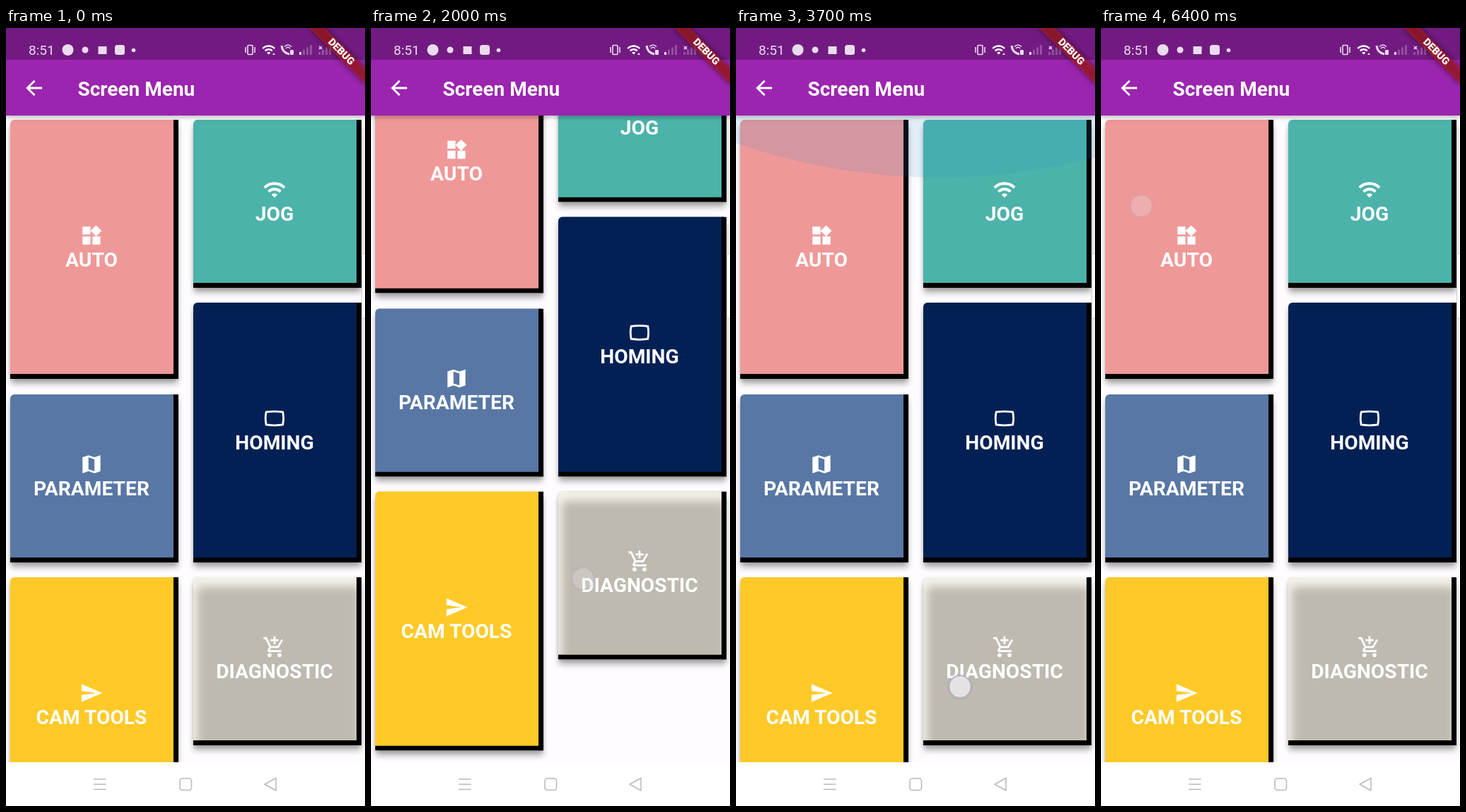
An HTML page that plays this animation: 508x1102 px, repeating every 6500 ms.

```html
<!DOCTYPE html>
<html lang="en">
<head>
<meta charset="utf-8">
<title>Screen Menu</title>
<style>
html, body { margin: 0; width: 100%; height: 100%; overflow: hidden; background: #fff; }
#stage { position: relative; width: 508px; height: 1102px; overflow: hidden; background: #fff; font-family: Roboto, sans-serif; }
#view { position: absolute; top: 124px; left: 0; width: 508px; height: 916px; overflow: hidden; background: #fefcfe; }
#view > svg, #over { position: absolute; top: 0; left: 0; }
.card { --drop: 0 8px 9px -1px rgba(0,0,0,.3), 0 2px 5px rgba(0,0,0,.14); position: absolute; box-sizing: border-box; width: 238px; border: solid #000; border-width: 0 7px 7px 0; border-radius: 6px 0 0 0; box-shadow: var(--drop); }
.sunken { box-shadow: inset 5px 13px 13px #f5f2ea, var(--drop); }
.card svg { position: absolute; left: 50%; top: 50%; width: 1px; height: 1px; overflow: visible; }
.card text { font: 700 28.2px Roboto, sans-serif; fill: #fff; text-anchor: middle; }
.solid { fill: #fff; fill-rule: evenodd; }
.line { fill: none; stroke: #fff; }
#bar { position: absolute; top: 0; left: 0; width: 508px; height: 124px; background: linear-gradient(#731a82 45px, #9b25af 45px); box-shadow: 0 3px 6px rgba(0,0,0,.25); }
#title { font: 700 28px Roboto, sans-serif; fill: #fff; }
#clock { font: 400 19px Roboto, sans-serif; }
#banner { position: absolute; left: 508px; top: 0; transform: rotate(45deg); }
#banner div { position: absolute; left: -56.4px; top: 39.5px; width: 112.9px; height: 16.9px; }
#banner .shade { background: rgba(0,0,0,.5); filter: blur(4px); }
#banner .label { background: rgba(183,28,28,.63); color: #fff; font: 900 14.4px/16.9px Roboto, sans-serif; text-align: center; }
</style>
</head>
<body>
<div id="stage">
  <div id="view">
    <div id="list"></div>
    <svg width="508" height="916"><ellipse id="glow" cx="288" rx="762" fill="#218cd2" fill-opacity=".13"/></svg>
  </div>
  <div id="bar"></div>
  <svg id="over" width="508" height="1102">
    <path class="line" stroke-width="2.8" d="M51 85H30.500M40.500 74.700L30.200 85l10.300 10.300"/>
    <text id="title" x="101.500" y="96">Screen Menu</text>
    <g fill="#eadcee">
      <text id="clock" x="32" y="38">8:51</text>
      <circle cx="87.500" cy="31" r="8"/>
      <circle cx="112" cy="31" r="4.500"/>
      <rect x="130.500" y="26" width="12" height="11"/>
      <rect x="154" y="24" width="14" height="14" rx="3.500"/>
      <circle cx="180.500" cy="31.500" r="2.800"/>
      <path d="M377 38l2-3 2 3z"/>
      <rect x="402" y="31" width="5" height="7" rx="1"/>
      <g id="bars"></g>
      <rect x="468" y="25" width="10" height="13" rx="2" opacity=".5"/>
    </g>
    <g fill="none" stroke="#eadcee" stroke-width="1.600">
      <rect x="342" y="24.500" width="7" height="13" rx="1"/>
      <path d="M339 27v8M352 27v8M396 29q3-3.500 6 0M394 26.500q5-5 10 0M443 26l4 4m0-4l-4 4"/>
      <path stroke-width="3" d="M390 25q1 10 11 12"/>
    </g>
    <g id="signal"></g>
    <rect x="503.500" y="319.500" width="9" height="92" rx="3" fill="#fff" fill-opacity=".85" stroke="#c8c6c9" stroke-opacity=".8"/>
    <g fill="none" stroke="#b9b9b9" stroke-width="1.500">
      <path stroke-linejoin="round" d="M124 1064h17.500m-17.500 7.300h17.500m-17.500 7.200h17.500M382 1062.500v17.500l-16-8.750z"/>
      <rect x="246" y="1063" width="16.500" height="16.500" rx="3.500"/>
    </g>
    <g id="touch">
      <circle r="18" fill="#8d88b5" fill-opacity=".18"/>
      <circle r="15.500" fill="#e8e7e6" fill-opacity=".92" stroke="#b3b0cb" stroke-width="1.600"/>
    </g>
  </svg>
  <div id="banner"><div class="shade"></div><div class="label">DEBUG</div></div>
</div>
<script>
const $ = id => document.getElementById(id);
const clamp = (v, lo = 0, hi = 1) => Math.min(hi, Math.max(lo, v));
const solid = d => `<path class="solid" d="${d}"/>`;
const line = (d, w = 2) => `<path class="line" stroke-width="${w}" d="${d}"/>`;

// icons on a 24 unit grid
const wifi = line('M2 10a14.140 14.140 0 0 1 20 0M6 14a8.500 8.500 0 0 1 12 0', 2.8) + solid('M9 17a4.240 4.240 0 0 1 6 0l-3 3z');
const widgets = solid('M3 3h8v8H3zM3 13h8v8H3zM13 13h8v8h-8zM16.700 1.700l5.600 5.600-5.600 5.700L11 7.300z');
const frame = line('M3.700 5.600Q12 4.400 20.300 5.600Q21.700 12 20.300 18.400Q12 19.600 3.700 18.400Q2.300 12 3.700 5.600z');
const map = solid('M3 5l6-2 6 2 6-2v16l-6 2-6-2-6 2zM9 5v12l6 2V7z');
const send = solid('M2 21l21-9L2 3v7l15 2-15 2z');
const wheel = x => `<circle class="solid" cx="${x}" cy="20" r="2"/>`;
const cart = line('M1 3h2.600l4.300 9h7.600l4.300-7.500M7.500 12.500L6 15.200Q5.800 16 7 16h12M12 1v8M8 5h8') + wheel(7) + wheel(17);

// label, column, first row, rows, colour, icon
const cards = [
  ['AUTO', 0, 0, 3, '#ef9898', widgets],
  ['JOG', 1, 0, 2, '#4cb3aa', wifi],
  ['HOMING', 1, 2, 3, '#022054', frame],
  ['PARAMETER', 0, 3, 2, '#5877a5', map],
  ['CAM TOOLS', 0, 5, 3, '#ffc927', send],
  ['DIAGNOSTIC', 1, 5, 2, '#bfbab0', cart]
];
const UNIT = 129.6, GAP = 21.4;
$('list').innerHTML = cards.map(([label, col, row, rows, color, icon]) =>
  `<div class="card${icon === cart ? ' sunken' : ''}" style="left:${5.5 + col * 259}px;top:${6 + row * UNIT}px;height:${rows * UNIT - GAP}px;background-color:${color}">
    <svg><g transform="translate(-17 -33) scale(1.411)">${icon}</g><text y="27.6">${label}</text></svg></div>`).join('');

// two signal meters, only the very first bar lit
$('bars').innerHTML = [415, 442].map((x, n) => [0, 1, 2, 3].map(i =>
  `<rect x="${x + i * 5}" y="${34 - i * 3.3}" width="3" height="${4 + i * 3.3}" opacity="${i || n ? .28 : 1}"/>`).join('')).join('');
$('signal').innerHTML = `<g transform="translate(361.500 20.500) scale(.85)">${wifi}</g>`;

const LOOP = 6500, STEP = 100, MAX_SCROLL = 121.5;
const drags = [
  { from: 200, to: 600, x: [285, 292], y: [930, 780] },
  { from: 800, to: 1200, x: [265, 273], y: [630, 813] },
  { from: 1500, to: 1900, x: [290, 300], y: [930, 780] },
  { from: 2800, to: 3700, x: [308, 317], y: [741, 933] },
  { from: 6300, to: 6300, x: [57, 57], y: [252, 252] }
];

// the list follows the finger; pulling past the top swells the glow
function state(t) {
  let scroll = 0, glow = 0, touch = { x: 0, y: 0, alpha: 0 };
  for (const { from, to, x, y } of drags) {
    const p = clamp((t - from) / (to - from || 1));
    const ease = p * p * (3 - 2 * p);
    const move = (y[1] - y[0]) * ease;
    const pull = Math.max(0, move - scroll);
    scroll = clamp(scroll - move, 0, MAX_SCROLL);
    glow = Math.max(glow, (1 - Math.exp(-pull / 36)) * clamp(1 - (t - to) / 300));
    const alpha = Math.min(clamp(1 + (t - from) / 150), clamp(1 - (t - to) / 145));
    if (alpha > touch.alpha) touch = { x: x[0] + (x[1] - x[0]) * ease, y: y[0] + move, alpha };
  }
  return { scroll, glow, touch };
}

const start = performance.now();
function draw() {
  const t = Math.floor((performance.now() - start) % LOOP / STEP) * STEP;
  const { scroll, glow, touch } = state(t);
  $('list').style.transform = `translateY(${-scroll}px)`;
  $('glow').setAttribute('cy', -660 * glow);
  $('glow').setAttribute('ry', 762 * glow);
  $('touch').setAttribute('transform', `translate(${touch.x} ${touch.y})`);
  $('touch').setAttribute('opacity', touch.alpha);
  requestAnimationFrame(draw);
}
draw();
</script>
</body>
</html>
```
